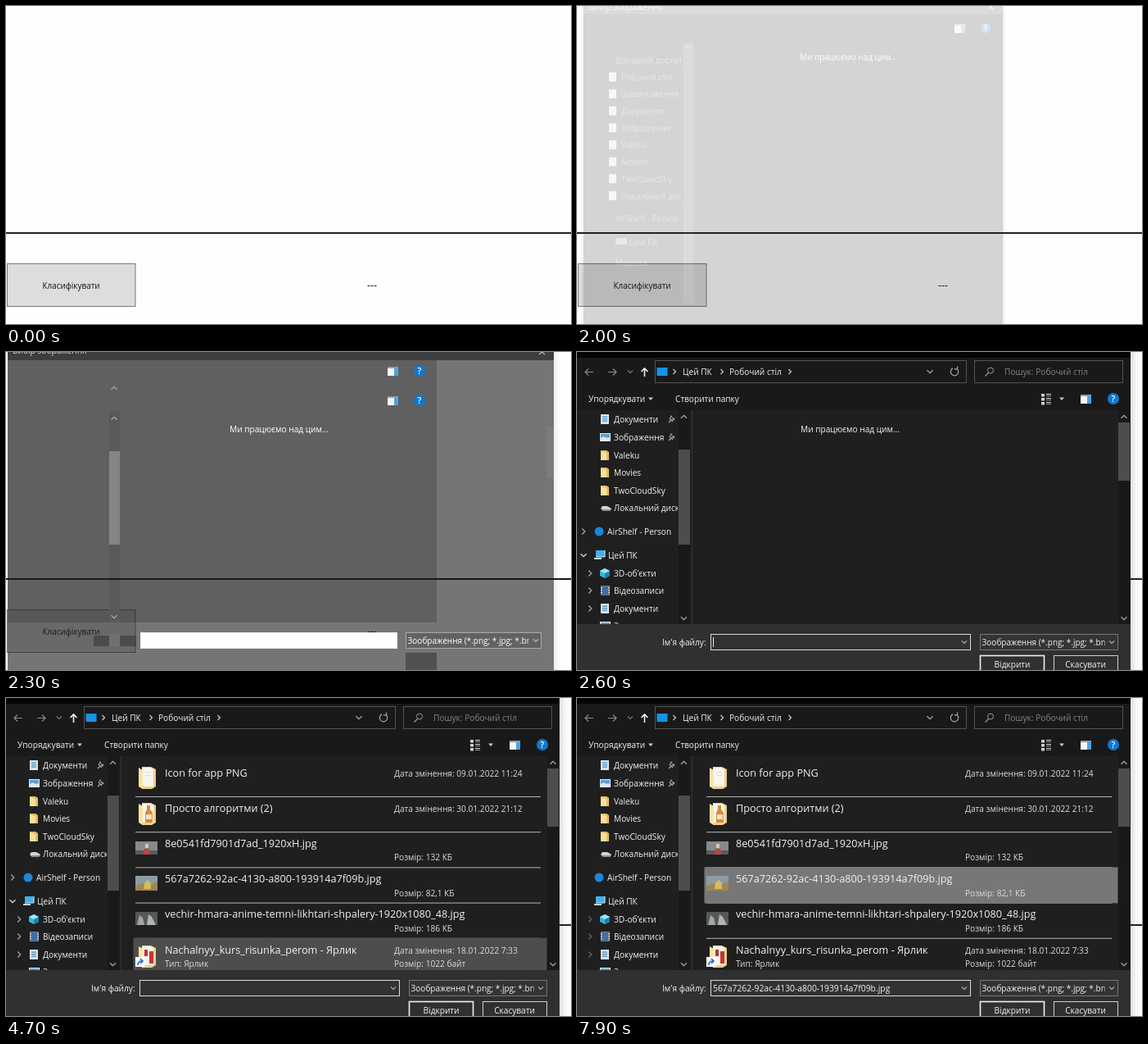
Recreate the animation shown at these times as an HTML page. Size 690 by 388 pixels, loop 8 s.

```html
<!DOCTYPE html>
<html lang="uk">
<head>
<meta charset="utf-8">
<title>Вибір зображення</title>
<style>
  html, body { margin: 0; width: 100%; height: 100%; overflow: hidden; background: #fff; }
  svg { display: block; width: 690px; height: 388px; }
  text { font-family: "Open Sans", "Noto Sans", sans-serif; white-space: pre; }
</style>
</head>
<body>
<svg id="stage" viewBox="0 0 690 388" xmlns="http://www.w3.org/2000/svg"></svg>
<script>
const LOOP = 8000, STEP = 100;
const SMALL = 10.15, TITLE = 12.65, ROW = 43.2;
const DARK = '#232323';

// drawing helpers; text is placed by its vertical middle
const box = (x, y, w, h, fill, more = '') =>
  `<rect x="${x}" y="${y}" width="${w}" height="${h}" fill="${fill}" ${more}/>`;
const frame = (x, y, w, h, stroke, fill = 'none', width = 1) =>
  box(x + .5, y + .5, w - 1, h - 1, fill, `stroke="${stroke}" stroke-width="${width}"`);
const text = (x, y, str, size = SMALL, fill = '#f2f2f2', more = '') =>
  `<text x="${x}" y="${y + size * .36}" font-size="${size}" fill="${fill}" ${more}>${str}</text>`;
const line = (d, stroke = '#ccc', width = 1.2) =>
  `<path d="${d}" fill="none" stroke="${stroke}" stroke-width="${width}"/>`;
const shape = (d, fill) => `<path d="${d}" fill="${fill}"/>`;
const group = (id, body, more = '') => `<g id="${id}" ${more}>${body}</g>`;
const MIDDLE = 'text-anchor="middle"';

const chevron = (x, y, dir, stroke = '#aaa', s = 3.5) => {
  const h = s / 2;
  const d = {
    right: `M${x - h} ${y - s}l${s} ${s}l${-s} ${s}`,
    down: `M${x - s} ${y - h}l${s} ${s}l${s} ${-s}`,
    up: `M${x - s} ${y + h}l${s} ${-s}l${s} ${s}`
  }[dir];
  return line(d, stroke);
};
const caretDown = (x, y) => shape(`M${x - 3} ${y - 1.5}h6l-3 3.5z`, '#ccc');
const help = (x, y, r = 7) =>
  `<circle cx="${x}" cy="${y}" r="${r}" fill="#1278d0"/>` +
  text(x, y, '?', 10.5, '#fff', MIDDLE + ' font-weight="600"');
const pane = (x, y) =>
  box(x, y, 13, 11, '#f4f4f4') + box(x, y, 13, 2, '#9a9a9a') + box(x + 8, y + 2, 5, 9, '#4ba3e3');

// small sidebar icons, all anchored at left edge and middle
const icons = {
  doc: (x, y) => box(x, y - 6, 10, 12, '#d9e4ea') +
    [-3.5, -1, 1.5].map(d => box(x + 2, y + d, 6, 1.3, '#4b8fc4')).join(''),
  image: (x, y) => box(x - 1, y - 5, 13, 10, '#e4eef5') + box(x, y - 4, 11, 8, '#5d9fcb') +
    shape(`M${x} ${y + 4}v-3l4-2l3 2l2-1l2 1v3z`, '#dbe9ee'),
  folder: (x, y) => shape(`M${x} ${y - 6}h7l3 2v10h-10z`, '#e3bd62') +
    shape(`M${x} ${y - 5}l7 2v9h-7z`, '#fbe198'),
  disk: (x, y) => shape(`M${x + 2} ${y - 2}h6l5 3l-1 2h-10l-2-2z`, '#d4d4d4') + box(x + 2, y + 2, 10, 2, '#8d8d8d'),
  cloud: (x, y) => `<circle cx="${x + 6}" cy="${y}" r="5.5" fill="#1b86d8"/>`,
  pc: (x, y) => box(x + 1, y - 6, 11, 8, '#3fb2ee') + line(`M${x + 1} ${y + 2}h11v-8`, '#d7e6ee', 1) +
    box(x - 1, y + 3, 9, 2, '#c7d4dc'),
  cube: (x, y) => shape(`M${x + 5} ${y - 6}l6 3v6l-6 3l-6-3v-6z`, '#35b6dc') +
    shape(`M${x + 5} ${y}l6-3v6l-6 3z`, '#1c82ad') + shape(`M${x + 5} ${y - 6}l6 3l-6 3l-6-3z`, '#9fe3f5'),
  video: (x, y) => box(x, y - 6, 11, 12, '#777') + box(x + 2, y - 5, 7, 10, '#3b6ea8') +
    [-4, -1, 2].map(d => box(x, y + d, 1.5, 1.5, '#eee') + box(x + 9.5, y + d, 1.5, 1.5, '#eee')).join('')
};
const pin = y => line(`M112 ${y + 4}l3-3m-2-2l4 4m-3-7l5 5m-6-2l3-3m0 6l3-3`, '#aaa', 1.2);

// open folder seen from the side: flap, pages, back
const bigFolder = (y, mark) =>
  shape(`M166 ${y}h11l6 3v21l-5 3h-12z`, '#ecd08a') + shape(`M166 ${y + 1}h10l4 2v21h-14z`, '#f7f5ee') + mark +
  shape(`M162 ${y + 1}l5 3v23l-5-3z`, '#fae3a4');

const third = 'Valeku', fifth = 'TwoCloudSky', cloud = 'AirShelf - Person';
const side = [
  [82, 'doc', 'Документи'], [104, 'image', 'Зображення'], [126, 'folder', third],
  [147, 'folder', 'Movies'], [169, 'folder', fifth], [190, 'disk', 'Локальний диск'],
  [219, 'cloud', cloud, 37, 21], [248, 'pc', 'Цей ПК', 38, 22], [270, 'cube', "3D-об'єкти"],
  [291, 'video', 'Відеозаписи'], [313, 'doc', 'Документи'], [334, 'image', 'Завантаження']
];
const files = [
  ['Icon for app PNG', 'Дата змінення: 09.01.2022 11:24'],
  ['Просто алгоритми (2)', 'Дата змінення: 30.01.2022 21:12'],
  ['8e0541fd7901d7ad_1920xH.jpg', '', 'Розмір: 132 КБ'],
  ['567a7262-92ac-4130-a800-193914a7f09b.jpg', '', 'Розмір: 82,1 КБ'],
  ['vechir-hmara-anime-temni-likhtari-shpalery-1920x1080_48.jpg', '', 'Розмір: 186 КБ'],
  ['Nachalnyy_kurs_risunka_perom - Ярлик', 'Дата змінення: 18.01.2022 7:33', 'Розмір: 1022 байт']
];

function thumbs() {
  const sheet = box(170, 90, 7, 1, '#ddd') + box(170, 94, 7, 1, '#ddd');
  const bottle = shape('M172 131h4v5l3 4v12h-9v-12l2-4z', '#d98a3a') + box(171, 142, 7, 6, '#f3e3c0');
  const book = box(169, 307, 4, 8, '#b9343c') + box(175, 309, 5, 15, '#c53638');
  return bigFolder(84, sheet) + bigFolder(128, bottle) +
    box(158, 175, 27, 16, '#858a8e') + box(158, 186, 27, 5, '#585a5e') +
    shape('M168 191l1-7h6l2 7z', '#b8483c') + box(170, 178, 4, 5, '#dcc4b0') +
    box(158, 217, 27, 18, '#8c9ca6') + shape('M158 235v-6l9-3l8 2l10-4v11z', '#9c875a') +
    shape('M168 233l1-7l4-4l4 4v7z', '#d8bb55') +
    box(158, 261, 27, 16, '#55585a') + shape('M160 277l3-12l4 3l2 9z', '#a4a5a5') +
    shape('M172 277l2-13l4 3l5 10z', '#b4b4b4') +
    bigFolder(302, book) +
    box(158, 316, 11, 12, '#fff') + line('M161 326q0-5 5-5m-2-3l3 3l-3 3', '#1769c2', 1.6);
}

function fileList() {
  const rules = files.slice(1).map((_, i) => box(158, 120 + ROW * i, 495, 1, '#b4b4b4')).join('');
  const labels = files.map(([name, date, size], i) => {
    const y = 91 + ROW * i;
    return text(194, y, name, TITLE) +
      (date ? text(474, y + 1.5, date, SMALL, '#dcdcdc') : '') +
      (size ? text(474, y + 17.3, size, SMALL, '#dcdcdc') : '');
  }).join('');
  return rules + box(155.5, 0, 505, 44, '#4d4d4d', 'id="hover"') + thumbs() + labels +
    text(194, 324, 'Тип: Ярлик', SMALL, '#dcdcdc');
}

function sidebar() {
  const items = side.map(([y, icon, label, tx = 45, ix = 29]) =>
    icons[icon](ix, y) + text(tx, y, label)).join('');
  return group('sideItems', box(0, 325, 124, 20, '#4d4d4d', 'id="sideHover"') + items +
      group('topMarks', chevron(8, 219, 'right') + chevron(8, 248, 'down', '#ddd')) +
      group('subMarks', [270, 291, 313].map(y => chevron(16, y, 'right')).join('')),
    'clip-path="url(#sideClip)"') + pin(82) + pin(104);
}

function navigation() {
  return box(0, 0, 676, 7, '#050505') + box(0, 7, 676, 64, '#191919') +
    line('M20 24.5h-10m4-4l-4 4l4 4', '#8b8b8b') + line('M38 24.5h10m-4-4l4 4l-4 4', '#8b8b8b') +
    chevron(65, 24, 'down', '#777', 3) + line('M82.500 30v-10m-4 4l4-4l4 4', '#f2f2f2', 1.6) +
    frame(95, 10, 381, 28, '#535353') + box(97.5, 19, 13, 10, '#1593e6') +
    chevron(119, 24, 'right', '#ccc', 3) + text(129, 24, 'Цей ПК') + chevron(177, 24, 'right', '#ccc', 3) +
    text(186, 24, 'Робочий стіл') + chevron(260, 24, 'right', '#ccc', 3) +
    chevron(431, 24, 'down', '#aaa') +
    line('M464 20.5a4.7 4.7 0 1 1-5-.6m5.5-2.4v3.4h-3.6', '#aaa') +
    frame(485, 10, 182, 28, '#535353') +
    '<circle cx="505" cy="22.5" r="3.5" fill="none" stroke="#999"/>' + line('M502.500 25.500l-4 4', '#999') +
    text(522, 24, 'Пошук: Робочий стіл', SMALL, '#858585') +
    text(14, 57, 'Упорядкувати') + caretDown(90, 57) + text(120, 57, 'Створити папку') +
    [51, 56, 61].map(y => box(567, y, 4, 3.5, '#c6d2da') + box(573, y, 6, 1, '#ddd') + box(573, y + 2, 6, 1, '#999')).join('') +
    caretDown(592, 57) + pane(615, 52) + help(655, 57);
}

function footer() {
  return box(0, 332, 676, 56, '#303030') + text(104, 354, "Ім'я файлу:") +
    frame(163, 344, 318, 20, '#dcdcdc', '#323232') + chevron(473, 354, 'down', '#aaa', 3) +
    box(166, 348, 1, 12, '#eee', 'id="caret"') +
    text(166, 354, files[3][0], 10.35, '#f2f2f2', 'id="picked"') +
    frame(492, 344, 169, 20, '#777', '#343434') +
    text(494.5, 354, 'Зоображення (*.png; *.jpg; *.bmp)', 10, '#f2f2f2', 'clip-path="url(#typeClip)"') +
    chevron(653, 354, 'down', '#aaa', 3) +
    frame(492, 370, 79, 22, '#f0f0f0', '#303030', 1.6) + text(531.5, 381, 'Відкрити', SMALL, '#f2f2f2', MIDDLE) +
    frame(582, 370, 79, 22, '#d0d0d0', '#303030') + text(621, 381, 'Скасувати', SMALL, '#f2f2f2', MIDDLE);
}

function dialog() {
  return box(676, 0, 14, 388, 'url(#shade)') + box(676, 276, 14, 2, '#202024') +
    box(0, 0, 676, 388, '#1f1f1f') + navigation() +
    group('list', fileList(), 'clip-path="url(#listClip)"') + sidebar() +
    box(124, 71, 14, 261, '#191919') + box(124, 119, 14, 116, '#4d4d4d') +
    chevron(130.5, 79, 'up') + chevron(130.5, 325, 'down') + box(140, 71, 1, 261, '#343434') +
    box(661, 71, 14, 261, '#191919') + box(661, 86, 14, 71, '#4d4d4d') +
    chevron(668, 79, 'up') + chevron(668, 325, 'down') +
    group('busy', text(273, 94, 'Ми працюємо над цим...')) + footer();
}

// first translucent window while it grows in
function opening() {
  const labels = ['Робочий стіл', 'Завантаження', 'Документи', 'Зображення', third, 'Movies', fifth, 'Локальний диск'];
  const pale = '#8f8f8f', clipped = 'clip-path="url(#openClip)"';
  return box(8, -20, 512, 430, DARK, `stroke="${DARK}" stroke-width="5" stroke-opacity=".3"`) +
    box(8, -20, 512, 30, '#484848') +
    text(14, 1, 'Вибір зображення', SMALL, '#eee') + line('M502-2l6 6m0-6l-6 6', '#ddd') +
    pane(461, 22) + help(499, 27, 6) + text(272, 62, 'Ми працюємо над цим...', 10, '#fff') +
    text(47, 66, 'Швидкий доступ', 10, pale) +
    labels.map((s, i) => box(39, 81 + i * 20.7, 9, 11, '#ddd') + text(54, 87 + i * 20.7, s, 10, pale, clipped)).join('') +
    text(47, 259, cloud, 10, pale, clipped) +
    box(47, 283, 14, 8, pale) + text(64, 288, 'Цей ПК', 10, pale) + text(47, 313, 'Мережа', 10, pale) +
    box(130, 45, 13, 318, '#484848') + chevron(136, 49, 'up');
}

// second translucent window, wider, overlapping the first
function widening() {
  return box(669, 0, 12, 388, 'url(#shade)', 'opacity=".5"') + box(2, 0, 667, 388, DARK, 'opacity=".62"') +
    box(2, 10, 524, 320, DARK, 'opacity=".25"') + box(2, 0, 667, 10, '#111', 'opacity=".55"') +
    text(8, -2, 'Вибір зображення', SMALL, '#ddd') + line('M651-3l7 6m0-6l-7 6', '#bbb') +
    pane(466, 18) + help(505, 23) + pane(466, 54) + help(505, 59) +
    text(273, 94, 'Ми працюємо над цим...', SMALL, '#fff') +
    box(126, 72, 13, 258, '#595959') + box(126, 121, 13, 114, '#858585') +
    chevron(132, 44, 'up') + chevron(132, 81, 'up') + chevron(132, 323, 'down') +
    box(660, 91, 9, 63, '#7c7c7c') +
    box(107, 346, 52, 13, '#444', 'opacity=".8"') + box(126, 344, 13, 15, '#707070') +
    box(488, 367, 38, 21, '#505050') + frame(164, 342, 314, 20, '#eee', '#fff') +
    frame(488, 342, 166, 20, '#aaa', '#626262') +
    text(490.5, 352, 'Зоображення (*.png; *.jpg; *.bmp)', 10, '#fff', 'clip-path="url(#wideClip)"') +
    chevron(647, 352, 'down', '#bbb', 3) + box(0, 276, 690, 2, '#17171a');
}

const clip = (id, x, y, w, h) => `<clipPath id="${id}">${box(x, y, w, h, '#000')}</clipPath>`;
document.getElementById('stage').innerHTML =
  `<defs>${clip('sideClip', 0, 72, 123, 260)}${clip('listClip', 141, 71, 520, 261)}
   ${clip('typeClip', 493, 345, 151.5, 18)}${clip('wideClip', 489, 343, 149.5, 18)}${clip('openClip', 0, 40, 128, 300)}
   <linearGradient id="shade"><stop stop-color="#dedede"/><stop offset=".5" stop-color="#f8f8f8"/><stop offset="1" stop-color="#fefefe"/></linearGradient></defs>` +
  box(0, 0, 690, 388, '#fefefe') + box(0, 276, 690, 2, '#202024') +
  '<rect id="button" x="1.5" y="314.5" width="156.5" height="52"/>' +
  text(79.5, 341, 'Класифікувати', 9.95, '#111', MIDDLE) + text(441, 340, '---', 12.5, '#111') +
  group('opening', opening()) + group('widening', widening()) + group('dialog', dialog());

const el = id => document.getElementById(id);
const set = (id, attrs) => { for (const k in attrs) el(id).setAttribute(k, attrs[k]); };
const show = (id, on) => set(id, { display: on ? 'inline' : 'none' });
const at = (table, t) => table.reduce((v, [time, value]) => t >= time ? value : v, 0);

const fade = [[1600, .02], [1700, .04], [1800, .08], [1900, .13], [2000, .19], [2100, .36], [2200, .55], [2300, 0]];
const hoverRow = [[0, -1], [4300, 5], [5200, 4], [6400, 3]];
const caretOn = [[2400, 1], [3600, 0], [4100, 1], [4600, 0], [5100, 1], [6400, 0], [6700, 1], [7300, 0]];
const topMarks = [[0, 1], [5500, .75], [5600, .5], [6200, 0]];
const subMarks = [[0, 1], [5500, .75], [5600, .5]];

function draw(t) {
  const hot = t >= 700 && t < 900;
  set('button', { fill: hot ? '#bee6fd' : '#dddddd', stroke: hot ? '#3c7fb1' : '#777777' });

  const grow = .965 + .035 * Math.min(1, Math.max(0, (t - 1600) / 400)) + Math.max(0, t - 2000) * .00004;
  set('opening', { opacity: at(fade, t), transform: `translate(264 190) scale(${grow}) translate(-264 -190)` });
  show('widening', t >= 2300 && t < 2400);
  show('dialog', t >= 2400);
  show('sideItems', t >= 2500);
  show('list', t >= 2700);
  show('busy', t < 2700);
  show('sideHover', t >= 2700 && t < 3500);

  const row = at(hoverRow, t), picked = t >= 7300;
  set('hover', { y: 76.8 + ROW * row, opacity: row < 0 ? 0 : 1, fill: picked ? '#777777' : '#4d4d4d' });
  show('picked', picked);
  set('caret', { opacity: at(caretOn, t) });
  set('topMarks', { opacity: at(topMarks, t) });
  set('subMarks', { opacity: at(subMarks, t) });
}

const start = performance.now();
function tick() {
  const t = (performance.now() - start) % LOOP;
  draw(Math.floor(t / STEP) * STEP);
  requestAnimationFrame(tick);
}
tick();
</script>
</body>
</html>
```
